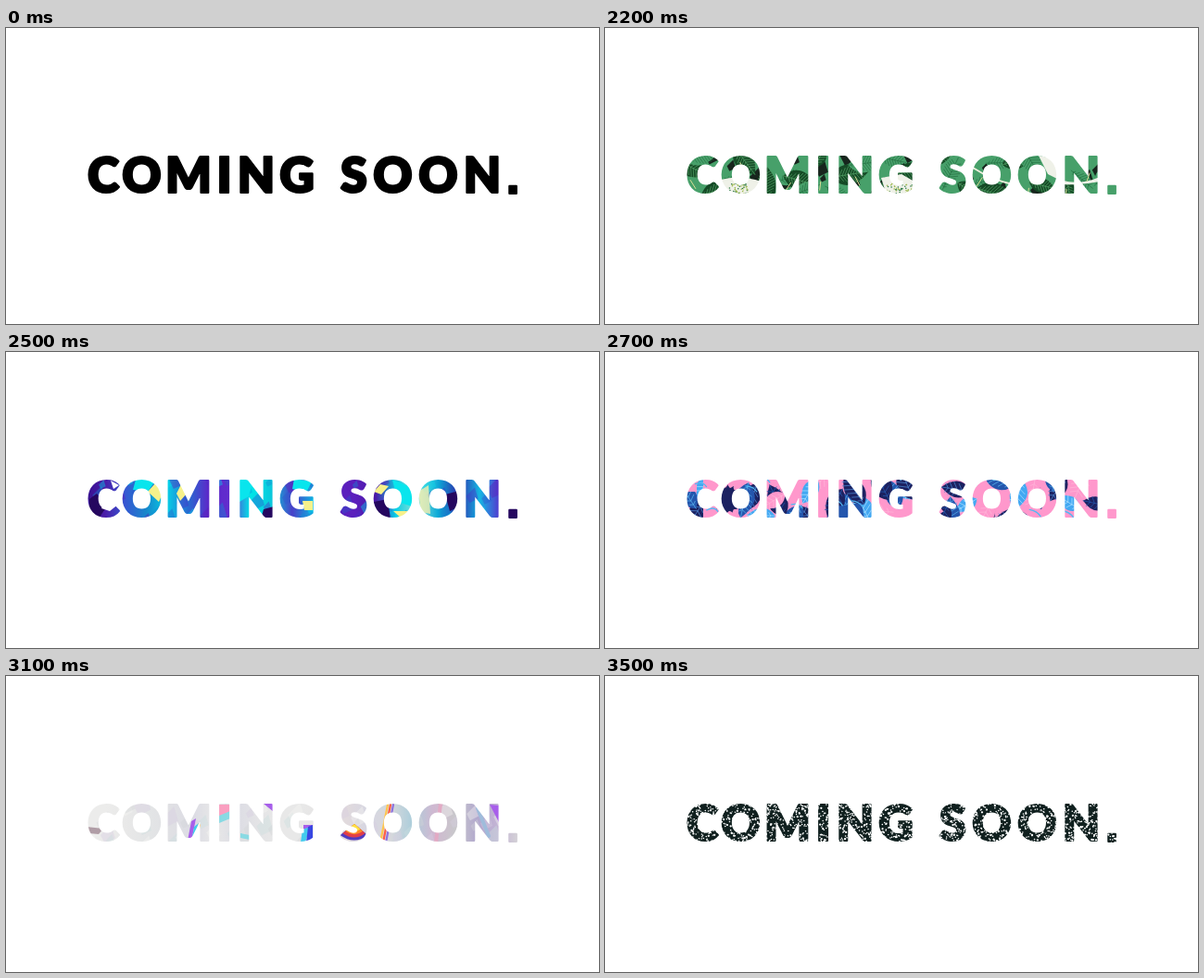
Recreate the animation shown at these times as an HTML page. Size 640x320 px, loop 3.6 s.

```html
<!DOCTYPE html>
<html lang="en">
<head>
<meta charset="utf-8">
<title>Coming soon</title>
<style>
html, body { margin: 0; width: 100%; height: 100%; overflow: hidden; background: #fff; }
svg { display: block; width: 640px; height: 320px; }
text { font: 900 52px Lato, sans-serif; text-anchor: middle; fill: #fff; stroke: #fff; stroke-width: 2.2px; stroke-linejoin: round; }
.stop { font: 700 53px "Liberation Sans", Arial, sans-serif; }
</style>
</head>
<body>
<svg viewBox="0 0 640 320" role="img" aria-label="COMING SOON.">
  <defs>
    <mask id="words" maskUnits="userSpaceOnUse" x="80" y="130" width="480" height="60">
      <text y="178.4" id="line"></text>
      <text y="178.6" x="547" class="stop">.</text>
    </mask>
  </defs>
  <g mask="url(#words)" id="fills"></g>
</svg>
<script>
const NS = "http://www.w3.org/2000/svg";
const LOOP = 3600, HOLD = 2000, STEP = 100;
const LEFT = 84, WIDE = 472, TOP = 137, TALL = 45;
const fills = document.getElementById("fills");
const line = document.getElementById("line");

function add(parent, tag, attrs) {
  const node = document.createElementNS(NS, tag);
  for (const key in attrs) node.setAttribute(key, attrs[key]);
  return parent.appendChild(node);
}

const centers = [105, 146.5, 197, 235.5, 270, 314, 375.5, 417.5, 466.5, 514];
[..."COMINGSOON"].forEach((c, i) => { add(line, "tspan", { x: centers[i] }).textContent = c; });

function random(seed) {
  return () => {
    seed = (seed * 16807) % 2147483647;
    return seed / 2147483647;
  };
}

const base = (g, fill) => add(g, "rect", { x: 80, y: 130, width: 480, height: 60, fill });
const shape = (g, fill, d, opacity = 1) => add(g, "path", { d, fill, opacity });
const stroke = (g, color, width, d) =>
  add(g, "path", { d, fill: "none", stroke: color, "stroke-width": width, "stroke-linecap": "round" });

// Calls draw(x, y, i) at jittered places spread evenly along the line.
function scatter(count, rnd, draw) {
  for (let i = 0; i < count; i++)
    draw(LEFT + (i + rnd()) * WIDE / count, TOP + rnd() * TALL, i);
}

function dots(g, color, width, count, rnd) {
  let d = "";
  scatter(count, rnd, (x, y) => { d += `M${x.toFixed(1)} ${y.toFixed(1)}h.1`; });
  stroke(g, color, width, d);
}

function blend(g, colors) {
  const id = "blend" + fills.childElementCount;
  const ramp = add(g, "linearGradient", { id, gradientUnits: "userSpaceOnUse", x1: LEFT, x2: LEFT + WIDE });
  colors.split(" ").forEach((c, i, all) =>
    add(ramp, "stop", { offset: i / (all.length - 1), "stop-color": "#" + c }));
  base(g, `url(#${id})`);
}

function shards(g, colors, count, rnd, opacity) {
  scatter(count, rnd, (x, y, i) => {
    const s = 4 + rnd() * 9;
    shape(g, colors[i % colors.length], `M${x} ${y}l${s} ${-s}l${s * 0.4} ${s * 1.3}l${-s} ${s * 0.5}z`, opacity);
  });
}

function leaf(g, x, y, len, turn, fill, vein, gap) {
  const wide = len * 0.55;
  const blade = add(g, "g", { transform: `translate(${x} ${y}) rotate(${turn}) translate(${-len / 2})` });
  shape(blade, fill, `M0 0Q${len * 0.4} ${-wide} ${len} 0Q${len * 0.4} ${wide} 0 0`);
  let d = `M0 0H${len}`;
  for (let s = gap; s < len * 0.85; s += gap) {
    const r = wide * 0.42 * Math.sin(Math.PI * s / len);
    d += `M${s} 0l${r * 0.6} ${-r}M${s} 0l${r * 0.6} ${r}`;
  }
  stroke(blade, vein, 0.7, d);
}

function leaves(g, tones, count, rnd, gap) {
  scatter(count, rnd, (x, y, i) => {
    const [fill, vein] = tones[i % tones.length];
    leaf(g, x, y, 26 + rnd() * 16, rnd() * 180 - 90, fill, vein, gap);
  });
}

function ocean(g) {
  const rnd = random(31);
  base(g, "#0796c6");
  scatter(90, rnd, (x, y, i) => {
    const s = 2 + rnd() * 6;
    stroke(g, i % 3 ? "#1b82dc" : "#09a0bd", 0.8 + rnd() * 1.5, `M${x} ${y}l${s} ${s * 0.8}`);
  });
}

function jungle(g) {
  const rnd = random(77);
  base(g, "#47a06a");
  shards(g, ["#17251d"], 26, rnd, 1);
  leaves(g, [["#154a26", "#4f9d62"], ["#47a06a", "#277345"]], 32, rnd, 3);
  shape(g, "#eff1e8", "M125 164q20-6 44 2v15h-44zM298 162l22-4 14 8v15h-30zM468 138l22 4v22l-12-6zM494 165q20 5 40-4v5q-20 4-40 3z");
  stroke(g, "#eef0dd", 1.8, "M397 151q20 13 43 18");
  scatter(22, rnd, (x, y) => stroke(g, "#d8df95", 1, `M${x} ${y}l${rnd() * 12 - 6} 9`));
  for (const x of [127, 304])
    for (let i = 0; i < 50; i++)
      stroke(g, i % 2 ? "#9db94e" : "#2e7946", 1.5, `M${x + rnd() * 28} ${168 + rnd() * 12}h.1`);
}

function paint(g) {
  const rnd = random(12);
  blend(g, "35108b 4a1ba8 3658d2 1687cb 08cfe6 276bd1 5d28c9 622dce 00e6e8 0ac9dc 4840c8 11aee0 5b20bd 5b20bd 4b18a4 12cce2 90e7d9 0baad8 2d2caa 15b7e3 5532ce 26085d");
  shards(g, ["#4b2dc9", "#118dd5", "#00dcef", "#2d55ce", "#5e18b9"], 75, rnd, 0.4);
  shape(g, "#25075f", "M90 159l8-6 10 15-8 12-10-8zM278 170l11-3v14h-14zM397 162l15-3 3 22h-14zM474 154l15-4v17l-10 5zM541 169h12v12h-12z");
  shape(g, "#09e5ed", "M140 138h22l-9 13-16-2zM252 138h15l-5 18-10 6zM311 137l19 3-6 12-15-4zM417 138l22 9-1 20-15-5z");
  shape(g, "#f6f18b", "M153 151l8-9 8 11-4 9zM184 153l7-14 5 13-8 9zM320 161h11v10h-9zM397 151l7-8 9 2-8 9zM418 172h18l-9 8z");
  shape(g, "#fff", "M107 160l15-4v8l-10 8-9-3zM113 139l9 5-6 4z");
  shape(g, "#fff0ad", "M445 151l11-7 2 31-10-2z", 0.75);
}

function tropics(g) {
  const rnd = random(55);
  base(g, "#ff98cc");
  leaves(g, [["#1c2261", "#4b83cf"], ["#2456ad", "#58b1ec"], ["#1c2261", "#2456ad"], ["#ff98cc", "#ffb4d8"], ["#43a8f2", "#a5dcff"]], 42, rnd, 5);
  shape(g, "#2456ad", "M360 138h31v14l-28 4z");
  shape(g, "#ff98cc", "M496 138h38v43h-38zM88 138h24l-12 22-12 4zM541 168h12v12h-12z");
  for (let i = 0; i < 8; i++) leaf(g, 508, 160, 30, i * 23, "#1c2261", "#1c2261", 9);
  scatter(16, rnd, (x, y) => stroke(g, "#52b8f3", 1.3, `M${x} ${y}q4 6 12 ${rnd() * 8}`));
}

function foil(g) {
  const rnd = random(91);
  blend(g, "ececeb ececeb e8e8e8 e3e5e6 e0e0e4 dcdce4 e8e8e8 dcdce4 e4e4e6 e8e8e8 e8e8e8 e6e4e4 e1dadd d6d6e2 d8d8dc adcedb d0b8d1 c8c8cb b2a8ce c5b5d5 d7d7d7");
  shards(g, ["#f4f4f2", "#d1d4d8", "#d8cce0", "#cbdedf"], 60, rnd, 0.4);
  shape(g, "#b09da6", "M87 163l18 2-5 6-11-1z");
  shape(g, "#fa9fc0", "M230 139h12v15h-12z");
  shape(g, "#89dae3", "M230 151l12-5v8l-12 5zM253 170l10 2v5l-10-2z");
  shape(g, "#a85fea", "M278 138h11v9zM200 157l5-3-4 20-5 4zM321 161h10v6h-10zM522 139l10 1v18z");
  shape(g, "#43cbed", "M203 163l5-4-4 17-4 3zM320 166l8-3-5 17h-5z");
  shape(g, "#ffb54f", "M208 159l2 2-5 18-3-1z");
  shape(g, "#3847e2", "M326 163l5-2v18l-7 1z");
  ["#503cc0", "#e13e49", "#ff8b25", "#ffe142"].forEach((color, i) => {
    const r = 22 - i * 4;
    shape(g, color, `M376 160l${-r * 0.7} ${r * 0.55}q${r * 0.7} ${r * 0.5} ${r * 1.35} 0z`);
  });
  ["#ffc54e", "#ff5d47", "#8e72dc"].forEach((color, i) => stroke(g, color, 2.2, `M${412 + i * 3} 139l-8 41`));
  stroke(g, "#e2aac4", 4, "M469 138l-5 42");
  stroke(g, "#9fbcdb", 4, "M509 143l12 30");
}

function speckle(g) {
  const rnd = random(48);
  base(g, "#10201f");
  dots(g, "#fff", 1.5, 1900, rnd);
  dots(g, "#fff", 2.2, 420, rnd);
  dots(g, "#10201f", 1.2, 500, rnd);
}

const black = g => base(g, "#000");
const across = "matrix(-1 0 0 1 640 0)", around = "rotate(180 320 159.5)";
const scenes = [
  [black],
  [ocean], [ocean, across], [jungle], [jungle, across],
  [paint, across], [paint], [paint, around],
  [tropics, around], [tropics, across], [tropics],
  [foil, across], [foil], [foil, around],
  [speckle, around], [speckle, across], [speckle]
].map(([draw, transform]) => {
  const g = add(fills, "g", transform ? { transform } : {});
  draw(g);
  return g;
});

function show(time) {
  const t = time % LOOP;
  const now = t < HOLD ? 0 : 1 + Math.floor((t - HOLD) / STEP);
  scenes.forEach((g, i) => g.setAttribute("display", i === now ? "inline" : "none"));
}

let start;
function tick(time) {
  start ??= time;
  show(time - start);
  requestAnimationFrame(tick);
}
show(0);
requestAnimationFrame(tick);
</script>
</body>
</html>
```
